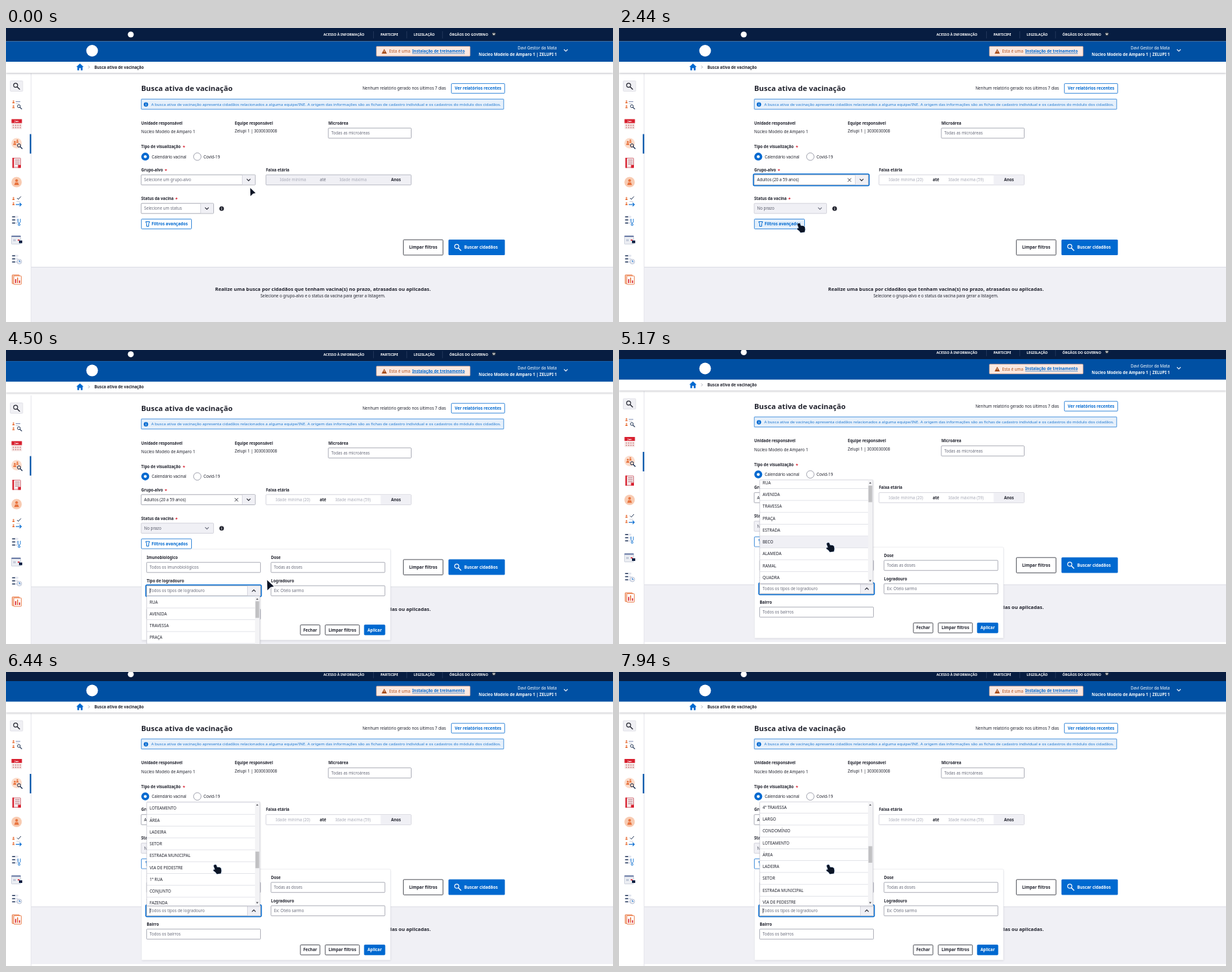
Recreate the animation shown at these times as an HTML page with a canvas. Size 934x453 px, loop 8000 ms.

```html
<!DOCTYPE html>
<html lang="pt-BR">
<head>
<meta charset="utf-8">
<title>Busca ativa de vacinação</title>
<style>
html, body { margin: 0; width: 100%; height: 100%; overflow: hidden; background: #fff; }
canvas { display: block; width: 934px; height: 453px; }
</style>
</head>
<body>
<canvas id="stage"></canvas>
<script>
const W = 934, H = 453, LOOP = 8000;
const INK = '#20222d', GREY = '#686b7a', PALE = '#a9abb8', LINE = '#9496a3', SOFT = '#c9cad4',
  FOG = '#f0f0f5', BLUE = '#0069d0', NAVY = '#071d41', RED = '#d8202f', ORANGE = '#e8743f', WHITE = '#fff';
const FONT = '"Noto Sans", "Open Sans", sans-serif';
const canvas = document.getElementById('stage'), c = canvas.getContext('2d');
const dpr = window.devicePixelRatio || 1;
canvas.width = W * dpr;
canvas.height = H * dpr;

// Timeline in ms
const OPEN_GROUP = 510, PICK = 1700, OPEN_PANEL = 2590, OPEN_DOSE = 3200, OPEN_STREET = 4250, FLIP = 4545;
const PATH = [[0, 376, 247], [130, 376, 247], [450, 350, 233], [560, 350, 233], [940, 326, 281], [1330, 322, 281],
  [1890, 322, 281], [2400, 277, 301], [2730, 277, 301], [3120, 440, 336], [3250, 440, 336], [3530, 437, 350],
  [3650, 431, 320], [3690, 431, 320], [3940, 382, 351], [4070, 382, 351], [4200, 381, 371], [4280, 381, 371],
  [4450, 402, 355], [4540, 402, 355], [4950, 322, 297], [LOOP, 322, 297]];
const HAND = [[300, 1780], [2330, 2850], [3220, 3600], [4150, 4390], [4640, LOOP]];
const WHEEL = [[5120, 5440, 0, 94], [5560, 5890, 94, 249], [6170, 6500, 249, 450], [6730, 7153, 450, 752],
  [7510, 7780, 752, 560], [7930, 7931, 560, 384]];

const GROUPS = ['Crianças (0 a 9 anos)', 'Adolescentes (10 a 19 anos)', 'Adultos (20 a 59 anos)',
  'Idosos (60 anos ou mais)', 'Gestantes'];
const DOSES = ['D', 'D1', 'D2', 'D3', 'DU', 'REF'];
const STREETS = ('RUA,AVENIDA,TRAVESSA,PRAÇA,ESTRADA,BECO,ALAMEDA,RAMAL,QUADRA,SERVIDÃO,PASSAGEM,VIELA,RODOVIA,' +
  'CAMINHO,1ª TRAVESSA,2ª TRAVESSA,3ª TRAVESSA,ACESSO,VILA,SÍTIO,ROTATÓRIA,4ª TRAVESSA,LARGO,CONDOMÍNIO,' +
  'LOTEAMENTO,ÁREA,LADEIRA,SETOR,ESTRADA MUNICIPAL,VIA DE PEDESTRE,1ª RUA,CONJUNTO,FAZENDA,TRECHO,PARQUE,' +
  'COLÔNIA,NÚCLEO,TREVO,VALE,MORRO,1ª AVENIDA,CORREDOR,2ª AVENIDA,BLOCO,VIA LOCAL,ESTRADA VELHA,PRAIA,' +
  'JARDIM,VIADUTO,ALTO').split(',');

const ease = k => k < .5 ? 2 * k * k : 1 - 2 * (1 - k) ** 2;
const mix = (a, b, k) => a + (b - a) * k;

function cursorAt(t) {
  const i = PATH.findIndex(p => p[0] > t), [t0, x0, y0] = PATH[i - 1], [t1, x1, y1] = PATH[i];
  const k = ease((t - t0) / (t1 - t0));
  return { x: mix(x0, x1, k), y: mix(y0, y1, k), hand: HAND.some(h => t >= h[0] && t < h[1]) };
}

// List offset now, and where it last stood still
function listAt(t) {
  let pos = 0, rest = 0;
  for (const [t0, t1, a, b] of WHEEL) {
    if (t < t0) break;
    pos = t < t1 ? mix(a, b, ease((t - t0) / (t1 - t0))) : b;
    rest = t < t1 || t0 > 7900 ? a : b;
  }
  return { pos, rest };
}

function text(s, x, y, color = INK, size = 6.2, align = 'left', weight = 400) {
  c.save();
  c.translate(x, y + size * .355);
  c.scale(.1, .1);
  c.font = `${weight} ${size * 10}px ${FONT}`;
  c.textAlign = align;
  c.fillStyle = color;
  c.fillText(s, 0, 0);
  c.restore();
}
const bold = (s, x, y, color = INK, size = 6.1, align = 'left') => text(s, x, y, color, size, align, 700);

function rect(x, y, w, h, fill) {
  c.fillStyle = fill;
  c.fillRect(x, y, w, h);
}
function box(x, y, w, h, fill, stroke, r = 1, lw = .8) {
  c.beginPath();
  c.roundRect(x, y, w, h, r);
  if (fill) { c.fillStyle = fill; c.fill(); }
  if (stroke) { c.strokeStyle = stroke; c.lineWidth = lw; c.stroke(); }
}
function disc(x, y, r, fill, stroke, lw = .8) {
  c.beginPath();
  c.arc(x, y, r, 0, 7);
  if (fill) { c.fillStyle = fill; c.fill(); }
  if (stroke) { c.strokeStyle = stroke; c.lineWidth = lw; c.stroke(); }
}
function line(color, lw, ...p) {
  c.beginPath();
  for (let i = 0; i < p.length; i += 2) c.lineTo(p[i], p[i + 1]);
  c.strokeStyle = color;
  c.lineWidth = lw;
  c.stroke();
}
function poly(fill, ...p) {
  c.beginPath();
  for (let i = 0; i < p.length; i += 2) c.lineTo(p[i], p[i + 1]);
  c.closePath();
  c.fillStyle = fill;
  c.fill();
}
const chevron = (x, y, color = INK, d = 1.4, w = 2.8) => line(color, 1.1, x - w, y - d, x, y + d, x + w, y - d);
function lens(x, y, r, color, lw = 1.2) {
  disc(x, y, r, null, color, lw);
  line(color, lw * 1.15, x + r * .7, y + r * .7, x + r * 2.1, y + r * 2.1);
}
function shadowed(draw, alpha = .3) {
  c.save();
  c.shadowColor = `rgba(40,42,60,${alpha})`;
  c.shadowBlur = 3 * dpr;
  c.shadowOffsetY = dpr;
  draw();
  c.restore();
}
const ring = (x, y, w, h) => box(x - 1.3, y - 1.3, w + 2.6, h + 2.6, null, BLUE, 2, 1.5);
const label = (s, x, y) => bold(s, x, y);
function required(s, x, y, starX) {
  label(s, x, y);
  bold('*', starX, y + .8, RED, 6.6);
}
function field(x, y, w, h, hint, focus) {
  box(x, y, w, h, WHITE, LINE);
  if (focus) ring(x, y, w, h);
  text(hint, x + 4.5, y + h / 2, GREY);
}
function caret(x, y, t, start) {
  if ((t - start) % 1060 < 530) rect(x, y - 3.8, .7, 7.6, INK);
}
function button(s, x, y, w, h, color, fill, size = 6.3) {
  box(x, y, w, h, fill, color === WHITE ? fill : color, 1.2, .8);
  bold(s, x + w / 2, y + h / 2, color, size, 'center');
}

function topBars() {
  rect(0, 0, W, 20.5, NAVY);
  rect(0, 20.5, W, 31.5, '#0050a3');
  disc(192, 10, 4.6, WHITE);
  [['ACESSO À INFORMAÇÃO', 488.5], ['PARTICIPE', 576.3], ['LEGISLAÇÃO', 627.3], ['ÓRGÃOS DO GOVERNO', 682.3]]
    .forEach(([s, x]) => bold(s, x, 10.6, WHITE, 5.3));
  [565, 616.5, 671.5].forEach(x => rect(x, 5, .6, 11, '#34476a'));
  disc(750.7, 9.3, 2.8, '#38414c');
  chevron(750.7, 9.3, WHITE, .9, 1.7);
  disc(132.5, 35, 9, WHITE);
  box(570, 28.4, 144, 14.8, '#fbe9e1', '#f1b294', .8);
  poly('#a34712', 582, 32.3, 586, 39.6, 578, 39.6);
  rect(581.6, 34.6, .8, 2.6, WHITE);
  text('Esta é uma', 589.5, 35.8, '#b3541e', 6.3);
  bold('Instalação de treinamento', 625, 35.8, BLUE, 6.1);
  rect(625, 39, 81, .6, BLUE);
  text('Davi Gestor da Mata', 847.5, 31.2, WHITE, 6.3, 'right');
  bold('Núcleo Modelo de Amparo 1 | ZELUPI 1', 847.5, 40.8, WHITE, 6.2, 'right');
  chevron(861.4, 34.4, WHITE, 1.4, 2.8);
  shadowed(() => rect(0, 52, W, 17, WHITE));
  rect(0, 50, W, 2, '#0050a3');
  poly(BLUE, 113.8, 54.8, 119.4, 60, 117.8, 60, 117.8, 65.2, 115, 65.2, 115, 61.8, 112.6, 61.8, 112.6, 65.2,
    109.8, 65.2, 109.8, 60, 108.2, 60);
  line(LINE, .8, 126.6, 58.2, 128.6, 60.2, 126.6, 62.2);
  bold('Busca ativa de vacinação', 136, 60.4);
}

function sideBar() {
  const slate = '#6a7ba6', cream = '#fbdccb';
  const person = (x, y, s) => {
    disc(x, y - s, s * .75, ORANGE);
    poly(ORANGE, x - s * 1.3, y + s * 1.4, x - s * .8, y, x + s * .8, y, x + s * 1.3, y + s * 1.4);
  };
  const lines = (x, y, n) => {
    for (let i = 0; i < n; i++) {
      box(x, y + i * 4.8, 10, 3, '#e3e6ef', null, 1);
      rect(x + .5, y + i * 4.8 + .8, 4.5, 1.2, NAVY);
    }
  };
  rect(0, 70, 38.5, H, WHITE);
  rect(38.3, 70, .8, H, '#dcdde5');
  rect(36.6, 163.5, 2.2, 30, '#0052a8');
  box(6.5, 81.5, 19.3, 16, '#f0f0f4', '#d5d6de', 1, .6);
  lens(14.8, 88.3, 3.1, INK, 1.2);
  // patients
  person(11.5, 114, 1.5); person(11.5, 121.5, 1.5);
  rect(15, 113, 7, .9, slate); rect(15, 116, 5, .9, SOFT); lens(19.8, 120.5, 2.2, NAVY, .9);
  // calendar
  box(8.5, 140.5, 16, 15.5, '#f6e9e8', null, 1);
  rect(8.5, 140.5, 16, 6, RED);
  bold('Jan', 16.5, 143.8, WHITE, 4, 'center');
  for (let i = 0; i < 8; i++) rect(10.5 + i % 4 * 3.5, 149 + (i >> 2) * 3.5, 1.8, 1.8, '#d48a8a');
  // active search
  disc(16.3, 177.5, 8, cream); person(13.5, 177.5, 2); person(17.5, 174.5, 1.6); lens(20, 181, 2.5, NAVY, 1);
  // record
  box(10.5, 200.5, 12, 14.5, '#f6eaec', '#c8505c', .8, .8);
  rect(9.8, 200, 2.4, 15.6, RED);
  [203, 206, 209].forEach(y => rect(14, y, 7, .9, '#a9626c'));
  rect(18.5, 211, 4.5, 4.5, RED);
  // citizen
  disc(16.3, 237.5, 8, '#f8cbb2'); person(16.3, 238, 2.8);
  // referral
  person(11.5, 263, 1.5); person(11.5, 271, 1.5);
  line(NAVY, .9, 17, 262, 19, 264, 23, 259.5);
  rect(16, 267, 6, .9, SOFT);
  line(BLUE, 1.1, 15, 272, 23.5, 272); line(BLUE, 1.1, 21, 269.5, 23.5, 272, 21, 274.5);
  // care list
  lines(9, 289.5, 3);
  line(BLUE, .9, 18.5, 294, 18.5, 299, 20.2, 301, 22, 299, 22, 294); disc(20.2, 303, 1.4, null, BLUE, .9);
  // desk
  box(8.5, 320, 14, 13, '#eceef3', '#b4bccd', .6, .6);
  rect(8.5, 320, 14, 2, slate); rect(11, 325.5, 4, 3, '#c3cad9'); rect(18, 326, 3, 1.6, RED); rect(20, 327.5, 5, 4, NAVY);
  // schedule list
  lines(9, 349.5, 3); disc(20.5, 360, 3.6, '#e8ebf2', '#a3aec6', .7);
  line(BLUE, .8, 20.5, 358, 20.5, 360, 22.3, 360);
  // reports
  box(9.5, 380.5, 11, 13.5, '#f9cdb6', ORANGE, .6, .9);
  box(12, 382, 11.5, 13, WHITE, ORANGE, .6, .9);
  rect(14, 387, 1.6, 6, RED); rect(17, 384.5, 1.6, 8.5, ORANGE); rect(20, 389, 1.6, 4, RED);
}

function chooser(x, y, w, value, color, focus, up) {
  box(x, y, w, 15.6, WHITE, LINE);
  rect(x + w - 20, y + .5, 19.6, 14.6, FOG);
  rect(x + w - 20.4, y + .5, .7, 14.6, SOFT);
  if (focus) ring(x, y, w, 15.6);
  text(value, x + 4.5, y + 7.8, color);
  chevron(x + w - 10.3, y + 7.8, INK, up ? -1.4 : 1.4);
}

function form(t) {
  const picked = t >= PICK, panel = t >= OPEN_PANEL;
  bold('Busca ativa de vacinação', 208, 93.4, INK, 11.3);
  text('Nenhum relatório gerado nos últimos 7 dias', 677, 92.9, INK, 6.2, 'right');
  button('Ver relatórios recentes', 685.3, 85.6, 82, 15, BLUE, WHITE, 6.3);
  box(208.2, 109.6, 557.6, 15.6, '#e6f0fb', BLUE, .6, .7);
  disc(215.3, 117.8, 3.4, BLUE);
  rect(214.9, 117.2, .9, 2.6, WHITE); rect(214.9, 115.6, .9, .9, WHITE);
  text('A busca ativa de vacinação apresenta cidadãos relacionados a alguma equipe/INE. A origem das informações ' +
    'são as fichas de cadastro individual e os cadastros do módulo dos cidadãos.', 223.4, 117.4, '#1f78d1', 6.19);
  label('Unidade responsável', 208, 146.8);
  label('Equipe responsável', 352, 146.8);
  label('Microárea', 496, 146.8);
  text('Núcleo Modelo de Amparo 1', 208, 159.8);
  text('Zelupi 1 | 3030030008', 352, 158.9);
  field(496, 154.2, 127.5, 15.6, 'Todas as microáreas');
  required('Tipo de visualização', 208, 183, 272);
  disc(214.3, 198.2, 6.1, BLUE); disc(214.3, 198.2, 2.3, WHITE);
  disc(294.4, 198.2, 5.8, WHITE, LINE, .9);
  text('Calendário vacinal', 224.3, 198.4);
  text('Covid-19', 304, 198.4);

  required('Grupo-alvo', 208, 218.8, 244.3);
  const typing = t >= OPEN_GROUP && t < PICK;
  chooser(208, 226.2, 175.6, picked ? GROUPS[2] : 'Selecione um grupo-alvo', picked ? INK : GREY,
    t >= OPEN_GROUP && !panel, typing);
  if (typing) caret(212.2, 234, t, OPEN_GROUP);
  if (picked) {
    line(INK, .9, 352, 231.6, 357.2, 236.8);
    line(INK, .9, 357.2, 231.6, 352, 236.8);
  }
  label('Faixa etária', 400, 218.8);
  box(400, 226.2, 223.4, 15.6, picked ? WHITE : FOG, picked ? SOFT : '#a8aab6');
  if (picked) rect(576.5, 226.6, 46.5, 14.8, FOG);
  const span = picked ? [' (20)', ' (59)'] : ['', ''];
  text('Idade mínima' + span[0], 441.5, 234.2, PALE, 6.2, 'center');
  text('Idade máxima' + span[1], 534, 234.2, PALE, 6.2, 'center');
  text('até', 487.7, 234.2, picked ? INK : GREY, 6.2, 'center', picked ? 700 : 400);
  bold('Anos', 600, 234.2, INK, 6.1, 'center');

  required('Status da vacina', 208, 262.8, 260.5);
  if (picked) {
    box(208, 270.2, 111.4, 15.6, FOG, SOFT);
    text('No prazo', 212.5, 278, '#565968');
    chevron(309.2, 278, GREY);
  } else chooser(208, 270.2, 111.4, 'Selecione um status', GREY);
  disc(331.8, 278.2, 3.5, INK);
  rect(331.4, 277.6, .9, 2.6, WHITE); rect(331.4, 276, .9, .9, WHITE);

  const hover = t >= 2340 && t < 2850;
  box(208.3, 294.4, 77.2, 15.2, hover ? '#e3effb' : WHITE, BLUE, 1.2, .8);
  line(BLUE, 1, 215, 298.4, 221, 298.4, 219.6, 301.6, 219.6, 305.6, 216.4, 305.6, 216.4, 301.6, 215, 298.4);
  bold('Filtros avançados', 224, 302, BLUE, 6.4);
  button('Limpar filtros', 611.4, 326.3, 61, 23.6, INK, WHITE, 6.4);
  box(680.8, 326, 86.8, 24, BLUE, null, 1.5);
  lens(693.6, 336.5, 3.2, WHITE, 1.2);
  bold('Buscar cidadãos', 705, 338, WHITE, 6.4);

  rect(39, 368, W, 88.5, FOG);
  rect(39, 368, W, .7, '#d3d4dd');
  bold('Realize uma busca por cidadãos que tenham vacina(s) no prazo, atrasadas ou aplicadas.', 487.6, 402.8, INK, 7.6, 'center');
  text('Selecione o grupo-alvo e o status da vacina para gerar a listagem.', 487.6, 413, INK, 6.25, 'center');
}

function panelBox(t) {
  const dose = t >= OPEN_DOSE && t < OPEN_STREET, street = t >= OPEN_STREET;
  shadowed(() => rect(208.5, 310.4, 383, 140, WHITE), .15);
  box(208.5, 310.4, 383, 140, WHITE, '#e3e4ea', 1, .6);
  label('Imunobiológico', 216.4, 323.3);
  field(216.4, 330.6, 175.2, 15.6, 'Todos os imunobiológicos');
  label('Dose', 407.8, 323.3);
  field(407.8, 330.6, 175.2, 15.6, 'Todas as doses', dose);
  label('Tipo de logradouro', 216.4, 359.2);
  chooser(216.4, 366.6, 175.2, 'Todos os tipos de logradouro', GREY, street, street);
  label('Logradouro', 407.8, 359.2);
  field(407.8, 366.6, 175.2, 15.6, 'Ex: Otelo sarmo');
  label('Bairro', 216.4, 395.2);
  field(216.4, 402.6, 175.2, 15.6, 'Todos os bairros');
  button('Fechar', 453, 427, 30, 15.4, INK, WHITE);
  button('Limpar filtros', 491.2, 427, 52.6, 15.4, INK, WHITE);
  button('Aplicar', 551.3, 427, 31.8, 15.4, WHITE, BLUE);
  if (dose) caret(412.3, 338.4, t, OPEN_DOSE);
  if (street) caret(221, 374.4, t, OPEN_STREET);
}

// Rows with a hover band, clipped to the menu
function menu(x, y, w, h, rows, pitch, offset, hover, draw) {
  shadowed(() => rect(x, y, w, h, WHITE));
  c.save();
  c.beginPath();
  c.rect(x, y, w, h);
  c.clip();
  rows.forEach((s, i) => {
    const top = y + i * pitch - offset;
    if (top > y + h || top + pitch < y) return;
    if (i === hover) rect(x, top, w, pitch, FOG);
    rect(x, top + pitch - .4, w, .7, '#d6d7df');
    draw(s, top + pitch / 2);
  });
  c.restore();
  box(x, y, w, h, null, '#c4c5cf', .6, .6);
}

function streetMenu(t, cur, scroll) {
  const up = t >= FLIP, y = up ? 206.7 : 382.6, h = 160, { pos, rest } = listAt(t);
  const inside = up && cur.x < 383;
  const hover = inside ? Math.floor((cur.y + scroll - y + rest) / 18.25) : -1;
  menu(216.6, y, 174, h, STREETS, 18.25, pos, hover, (s, m) => text(s, 221, m, INK, 6.3));
  rect(383.2, y + .3, 7, h - .6, '#f3f3f5');
  const end = STREETS.length * 18.25 - h;
  rect(383.8, y + 8 + 118 * Math.min(1, pos / end), 5.8, 25.5, '#c1c1c3');
  poly('#505058', 386.6, y + 3.2, 388.4, y + 5.6, 384.8, y + 5.6);
  poly('#505058', 386.6, y + h - 3.2, 388.4, y + h - 5.6, 384.8, y + h - 5.6);
}

function pointer({ x, y, hand }, size) {
  const shape = hand
    ? [0, 2.2, 1, 1, 2.6, .3, 4.2, 1, 5.4, 4.4, 9.4, 4.6, 11.4, 6, 12, 10, 11.2, 14, 5, 14.8, 3, 12.2, -.4, 9.6, .2, 8, 2.2, 8.2]
    : [-.2, -.4, 8, 7.2, 4, 8.2, .2, 12];
  c.save();
  c.translate(x, y);
  if (hand) c.translate(-2.6, -.6);
  else c.scale(size, size);
  c.lineJoin = 'round';
  poly('#0c1526', ...shape);
  c.strokeStyle = hand ? '#cfe0f5' : WHITE;
  c.lineWidth = 1.4;
  c.stroke();
  c.fill();
  c.restore();
}

function draw(t) {
  const scroll = t < 4480 ? 0 : t < FLIP ? 3.4 : 6.5, cur = cursorAt(t);
  c.setTransform(dpr, 0, 0, dpr, 0, 0);
  rect(0, 0, W, H, WHITE);
  c.save();
  c.translate(0, t < FLIP ? 0 : -scroll);
  sideBar();
  c.restore();
  c.save();
  c.translate(0, -scroll);
  topBars();
  form(t);
  if (t >= OPEN_GROUP && t < PICK)
    menu(208.2, 243, 175.2, 91.3, GROUPS, 18.25, 0, Math.floor((cur.y - 243) / 18.25), (s, m) => text(s, 212.5, m));
  if (t >= OPEN_PANEL) panelBox(t);
  if (t >= OPEN_DOSE && t < OPEN_STREET) {
    const hover = cur.x > 408 ? Math.floor((cur.y - 346.8) / 20.5) : -1;
    menu(408, 346.8, 174.2, 123, DOSES, 20.5, 0, hover, (s, m) => {
      box(414.6, m - 5.8, 11.4, 11.4, WHITE, LINE, 1, .9);
      text(s, 430.5, m);
    });
  }
  if (t >= OPEN_STREET) streetMenu(t, cur, scroll);
  c.restore();
  pointer(cur, t < OPEN_PANEL ? 1 : 1.28);
}

const start = performance.now();
function frame() {
  draw((performance.now() - start) % LOOP);
  requestAnimationFrame(frame);
}
frame();
</script>
</body>
</html>
```
